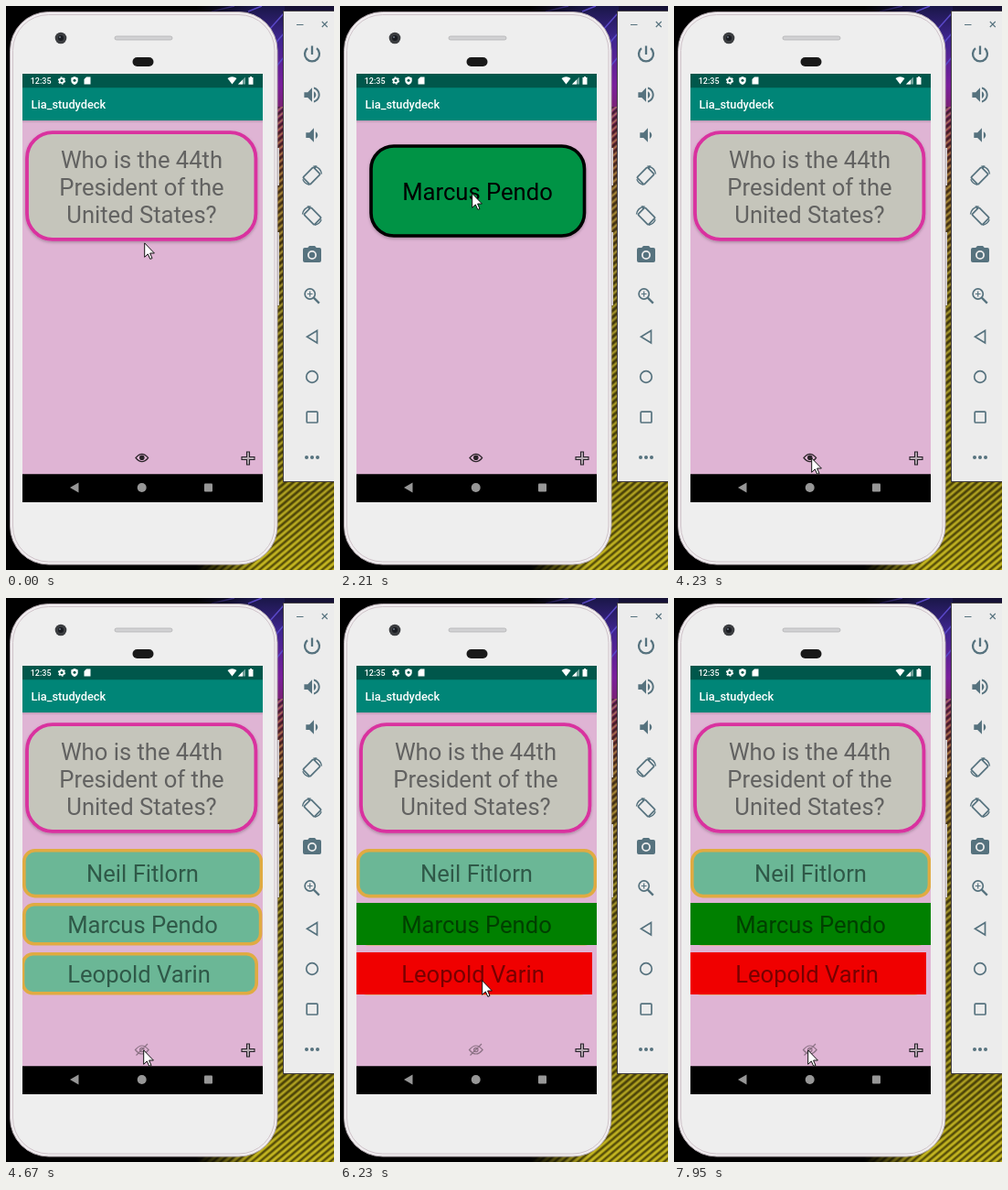
Animation, 359 px wide and 616 px high, one loop 8000 ms. Source, as an HTML page:

```html
<!DOCTYPE html>
<html lang="en">
<head>
<meta charset="utf-8">
<title>Flashcard demo</title>
<style>
html, body { margin: 0; width: 100%; height: 100%; overflow: hidden; background: #000; }
svg { display: block; }
text { font-family: Roboto, sans-serif; }
.big text { font-size: 25.6px; text-anchor: middle; }
.line { fill: none; stroke: #56727e; stroke-width: 1.7; }
.icon { fill: #56727e; }

.ask, .answer, .quiz, .result, .open { animation: 8s step-end infinite; }
.ask { animation-name: ask; }
.answer { animation-name: answer; }
.quiz { animation-name: quiz; }
.result { animation-name: result; }
.open { animation-name: open; }
.cursor { animation: move 8s step-end infinite; }

@keyframes ask { 0%, 40.375%, 100% { opacity: 1; } 27.625% { opacity: 0; } }
@keyframes answer { 0%, 40.375%, 100% { opacity: 0; } 27.625% { opacity: 1; } }
@keyframes quiz { 0% { opacity: 0; } 58.375%, 100% { opacity: 1; } }
@keyframes open { 0% { opacity: 1; } 58.375%, 100% { opacity: 0; } }
@keyframes result { 0% { opacity: 0; } 77.875%, 100% { opacity: 1; } }
@keyframes move {
  0% { transform: translate(151px, 258px); }
  1.875% { transform: translate(149px, 257px); }
  3.375% { transform: translate(141px, 250px); }
  4.875% { transform: translate(146px, 236px); }
  6.5% { transform: translate(158px, 222px); }
  8% { transform: translate(170px, 214px); }
  9.875% { transform: translate(162px, 208px); }
  11.375% { transform: translate(152px, 205px); }
  13% { transform: translate(146px, 204px); }
  14.75% { transform: translate(144px, 204px); }
  43.875% { transform: translate(113px, 340px); }
  45.375% { transform: translate(128px, 467px); }
  47.25% { transform: translate(136px, 485px); }
  49.125% { transform: translate(151px, 493px); }
  52.875% { transform: translate(150px, 493px); }
  64.25% { transform: translate(150px, 490px); }
  66.125% { transform: translate(152px, 470px); }
  67.75% { transform: translate(159px, 410px); }
  69.25% { transform: translate(162px, 376px); }
  71% { transform: translate(155px, 403px); }
  73% { transform: translate(155px, 414px); }
  74.5% { transform: translate(155px, 417px); }
  90.625% { transform: translate(142px, 453px); }
  92.5% { transform: translate(142px, 478px); }
  94% { transform: translate(142px, 487px); }
  95.875% { transform: translate(143px, 490px); }
  97.75% { transform: translate(145px, 492px); }
  99.375%, 100% { transform: translate(146px, 493px); }
}
</style>
</head>
<body>
<svg width="359" height="616" viewBox="0 0 359 616">
  <defs>
    <linearGradient id="feather" x2="0" y2="1">
      <stop offset="0" stop-color="#1a1748"/>
      <stop offset=".06" stop-color="#3f2590"/>
      <stop offset=".14" stop-color="#7a1f9c"/>
      <stop offset=".22" stop-color="#7c2450"/>
      <stop offset=".32" stop-color="#77502a"/>
      <stop offset=".5" stop-color="#72621c"/>
      <stop offset=".84" stop-color="#83760f"/>
      <stop offset="1" stop-color="#b0a212"/>
    </linearGradient>
    <linearGradient id="fade">
      <stop offset=".58" stop-color="#000"/>
      <stop offset=".76" stop-color="#000" stop-opacity="0"/>
    </linearGradient>
    <pattern id="barbs" width="12" height="5.500" patternUnits="userSpaceOnUse" patternTransform="rotate(-40)">
      <path d="M0 1.200H12" stroke="#1c1804" stroke-width="2" opacity=".65"/>
      <path d="M0 3.800H12" stroke="#efe248" stroke-width="1.200" opacity=".5"/>
    </pattern>
    <linearGradient id="shade" x2="0" y2="1">
      <stop offset="0" stop-opacity=".16"/>
      <stop offset="1" stop-opacity="0"/>
    </linearGradient>
    <filter id="soft" x="-10%" y="-10%" width="120%" height="130%">
      <feDropShadow dx="0" dy="1.5" stdDeviation="1.5" flood-opacity=".25"/>
    </filter>
    <clipPath id="screen"><path d="M18 74H281V542H18Z"/></clipPath>
  </defs>

  <!-- wallpaper -->
  <rect width="359" height="616" fill="url(#feather)"/>
  <rect y="110" width="359" height="506" fill="url(#barbs)"/>
  <path d="M225 6L250 0M265 6L280 0M288 26L304 8M292 44L304 30M296 66L304 56" stroke="#5a48c8" stroke-width="1.500"/>
  <path d="M305 0h54v5h-54z" fill="#120d26" opacity=".6"/>
  <rect width="359" height="616" fill="url(#fade)"/>

  <!-- phone -->
  <path d="M297 155h2v41h-2zM297 247h2v80h-2z" fill="#d8d4d6"/>
  <rect x="4.500" y="6.500" width="292.500" height="603.500" rx="42" fill="#f1eef0" stroke="#b3a8ae"/>
  <rect x="7.500" y="9.500" width="286.500" height="597.500" rx="39" fill="#eee" stroke="#cfc3c9"/>
  <circle cx="60" cy="35" r="6.300" fill="#3b3d40"/>
  <circle cx="60" cy="35" r="3" fill="#191b20"/>
  <circle cx="59" cy="34" r="1.100" fill="#66707c"/>
  <rect x="119" y="33" width="63" height="4" rx="2" fill="#d2d2d4" stroke="#b2b2b4" stroke-width=".8"/>
  <rect x="138.500" y="56" width="23" height="10" rx="5" fill="#191919"/>

  <!-- screen -->
  <g clip-path="url(#screen)">
    <path d="M18 74h263v468H18z" fill="#dfb4d4"/>
    <path d="M18 125h263v3H18z" fill="url(#shade)"/>
    <path d="M18 74h263v51.100H18z" fill="#008577"/>
    <path d="M18 74h263v15.300H18z" fill="#00574b"/>
    <path d="M18 511.300h263V542H18z"/>
    <text x="26.700" y="84.800" font-size="9" font-weight="500" fill="#fff">12:35</text>
    <text x="27.500" y="111.500" font-size="12.800" font-weight="500" fill="#fff">Lia_studydeck</text>
    <g fill="#fff">
      <circle cx="61" cy="81.500" r="2.400" fill="none" stroke="#fff" stroke-width="1.700"/>
      <circle cx="61" cy="81.500" r="3.600" fill="none" stroke="#fff" stroke-width="1.200" stroke-dasharray="1.880"/>
      <path d="M75 77l3.700 1.500v3q0 3-3.700 4.500q-3.700-1.500-3.700-4.500v-3z"/>
      <circle cx="75" cy="81.300" r="1.500" fill="#00574b"/>
      <path d="M88 77.500h4.500v8H85.500v-5.500z"/>
      <path d="M242.500 79q5-3.500 10 0l-5 6.500z"/>
      <path d="M262 77.500v8h-8z" opacity=".45"/>
      <path d="M259 80.500v5h-5z"/>
      <path d="M267 78v-1h2v1h1.500v7.700h-5V78z"/>
    </g>
    <g fill="#979797">
      <path d="M79.500 520.500v11l-9.500-5.500z"/>
      <circle cx="148.700" cy="526" r="5"/>
      <rect x="217" y="521.500" width="9" height="9" rx="1"/>
    </g>

    <g class="big">
      <g class="ask">
        <rect x="23" y="138.200" width="250.400" height="116.600" rx="28" fill="#c5c5bb" stroke="#d9309f" stroke-width="3.800" filter="url(#soft)"/>
        <g fill="#626261">
          <text x="148.500" y="176.800">Who is the 44th</text>
          <text x="148.500" y="206.800">President of the</text>
          <text x="148.500" y="236.800">United States?</text>
        </g>
      </g>
      <g class="answer">
        <rect x="34" y="153" width="233.500" height="98" rx="25" fill="#009345" stroke="#000" stroke-width="3.600" filter="url(#soft)"/>
        <text x="150.500" y="212.300">Marcus Pendo</text>
      </g>
      <g class="quiz" fill="#2f5948">
        <g fill="#6bb796" stroke="#e0ab42" stroke-width="3.600">
          <rect x="19.800" y="275.800" width="259.600" height="49.800" rx="12"/>
          <rect x="19.800" y="334.800" width="258.800" height="43" rx="11"/>
          <rect x="18.500" y="388.800" width="255.700" height="43" rx="11"/>
        </g>
        <text x="149.500" y="310.300">Neil Fitlorn</text>
        <text x="149.500" y="366.300">Marcus Pendo</text>
        <text x="145.500" y="420.300">Leopold Varin</text>
      </g>
      <g class="result">
        <path d="M18 333h263v46H18z" fill="#008000"/>
        <path d="M18 387h258v46H18z" fill="#f00000"/>
        <text x="149.500" y="366.300" fill="#003f00">Marcus Pendo</text>
        <text x="145.500" y="420.300" fill="#780000">Leopold Varin</text>
      </g>
    </g>

    <g class="open" fill="none" stroke="#2b2429" stroke-width="1.200">
      <path d="M142 493.500q6.800-8.200 13.600 0q-6.800 8.200-13.600 0z"/>
      <circle cx="148.800" cy="493.300" r="2.200" fill="#2b2429"/>
    </g>
    <g class="quiz" fill="none" stroke="#8c7285" stroke-width="1.200">
      <path d="M141.500 493.500q7.300-9 14.600 0q-7.300 9-14.600 0zM142.500 499.500l12.500-12.500"/>
      <circle cx="148.800" cy="493.500" r="2.200"/>
    </g>
    <path d="M263.500 487h3v5.500h5.500v3h-5.500v5.500h-3v-5.500h-5.500v-3h5.500z" fill="#b5a9b1" stroke="#28222a" stroke-width="1.100"/>
  </g>

  <!-- emulator toolbar -->
  <rect x="303.500" y="5.500" width="57" height="514" fill="#ececec" stroke="#403c40"/>
  <path d="M318 20.500h7.500M345.800 17l6 6M351.800 17l-6 6" class="line" style="stroke-width:1.100"/>
  <path d="M335 43.500v9.500M330 46.200a8 8 0 1 0 10 0" class="line" style="stroke-width:2.300"/>
  <g class="icon">
    <path transform="translate(323.500 85.500) scale(.96)" d="M3 9v6h4l5 5V4L7 9H3zm13.500 3c0-1.770-1.020-3.290-2.500-4.030v8.050c1.480-.730 2.500-2.250 2.500-4.020zM14 3.230v2.060c2.890.860 5 3.540 5 6.710s-2.110 5.850-5 6.710v2.060c4.010-.910 7-4.490 7-8.770s-2.990-7.860-7-8.770z"/>
    <path transform="translate(323.500 129.500) scale(.96)" d="M18.500 12c0-1.770-1.020-3.290-2.500-4.030v8.050c1.480-.730 2.500-2.250 2.500-4.020zM5 9v6h4l5 5V4L9 9H5z"/>
    <path transform="translate(323 260)" fill-rule="evenodd" d="M9 2L7.200 4H4q-2 0-2 2v12q0 2 2 2h16q2 0 2-2V6q0-2-2-2h-3.200L15 2zM12 7a5 5 0 1 1 0 10a5 5 0 1 1 0-10zM12 8.800a3.200 3.200 0 1 0 0 6.400a3.200 3.200 0 1 0 0-6.400z"/>
    <circle cx="329" cy="493" r="2"/><circle cx="335" cy="493" r="2"/><circle cx="341" cy="493" r="2"/>
  </g>
  <g class="line">
    <g id="turn" transform="translate(335 185)">
      <rect x="-5.500" y="-8" width="11" height="16" rx="1" transform="translate(-.5 .5) rotate(45)"/>
      <path d="M3-9.800a10 10 0 0 1 7.500 8.300M-3 10.200a10 10 0 0 1-7.200-6" stroke-width="1.400"/>
      <path d="M1-10.500l4.500-.2l-2 4z" fill="#56727e" stroke="none"/>
    </g>
    <use href="#turn" transform="matrix(-1 0 0 1 670 44)"/>
    <circle cx="332.700" cy="314.500" r="5.600"/>
    <path d="M336.800 318.600l6 6" stroke-width="2.300"/>
    <path d="M329.800 314.500h5.800M332.700 311.600v5.800" stroke-width="1.200"/>
    <path d="M340.500 354.500v13.500l-11-6.750z"/>
    <circle cx="335" cy="405" r="6.300"/>
    <rect x="329.200" y="443.200" width="11.800" height="11.800" rx="1"/>
  </g>

  <path class="cursor" d="M.7.900V16.300L4.300 12.900L6.800 18.400L9 17.500L6.600 12H11.400Z" fill="#fff" stroke="#111" stroke-width="1" stroke-linejoin="round"/>
</svg>
</body>
</html>
```
